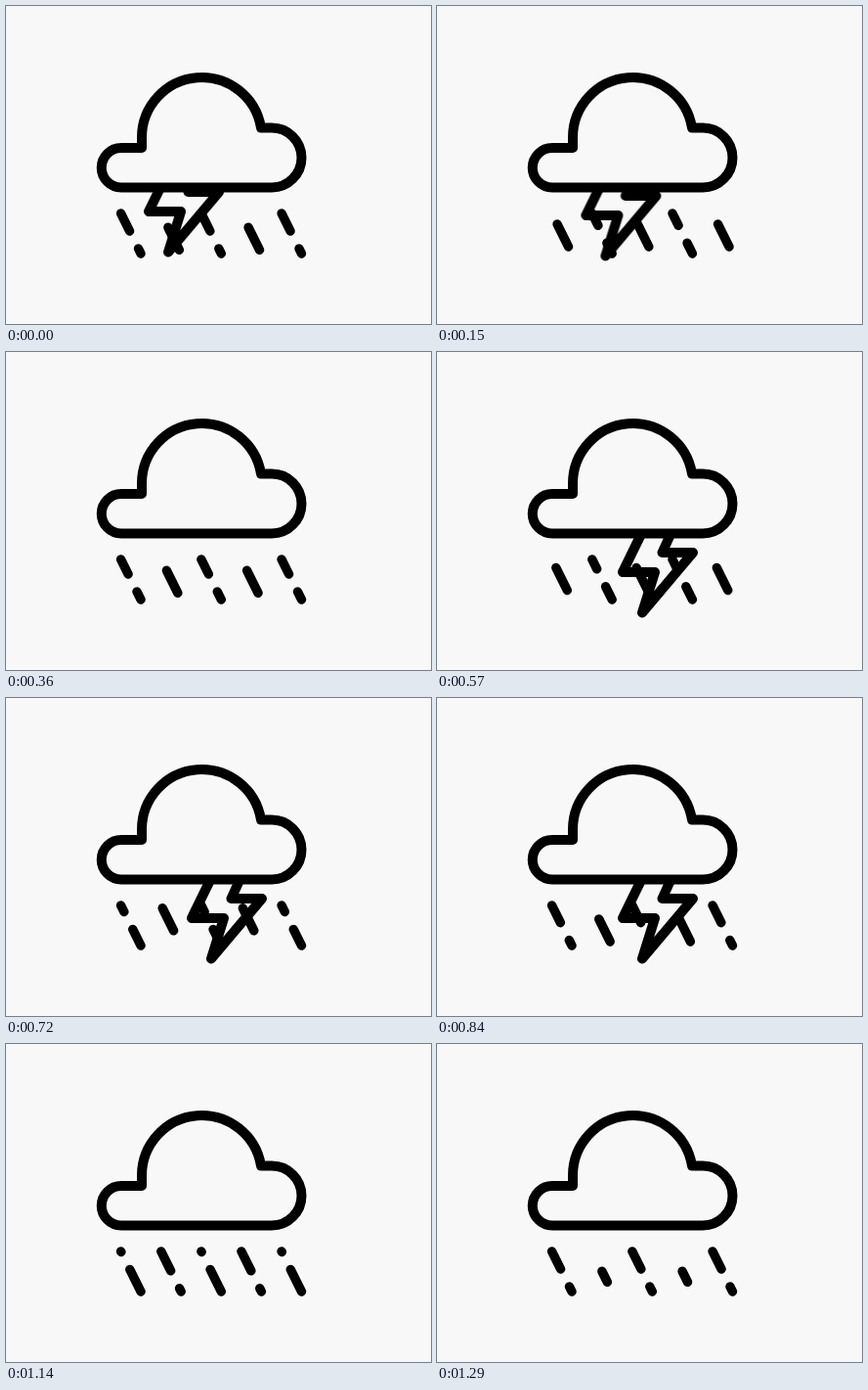
Animation, 435 px wide and 325 px high, one loop 1.35 s. Source, as an HTML page:

```html
<!DOCTYPE html>
<html lang="en">
<head>
<meta charset="utf-8">
<title>Thunderstorm</title>
<style>
  @property --fall { syntax: "<length>"; inherits: true; initial-value: 0px; }
  @property --trim { syntax: "<length>"; inherits: true; initial-value: 0px; }

  :root { --sky: #f8f8f8; --loop: 1350ms; }
  html, body { margin: 0; width: 100%; height: 100%; overflow: hidden; background: var(--sky); }
  svg {
    display: block; width: 435px; height: 325px;
    fill: none; stroke: #000; stroke-width: 10;
    stroke-linecap: round; stroke-linejoin: round;
  }
  .cloud { fill: var(--sky); }

  /* One dash pattern is exactly as long as a streak: 41 units */
  .rain { stroke-width: 9.5; animation: fall var(--loop) infinite; }
  .rain path {
    --lead: 0px;
    stroke-dasharray: calc(23px - 2 * var(--trim)) calc(18px + 2 * var(--trim));
    stroke-dashoffset: calc(5px - var(--lead) - var(--fall) - var(--trim));
  }
  .rain .even { --lead: 19.3px; animation: trim var(--loop) step-end infinite; }

  .flash { animation: flash var(--loop) step-end infinite; }
  .slide { animation: slide var(--loop) infinite; }
  .drop { animation: drop var(--loop) linear infinite; }

  @keyframes fall {
    0%     { --fall: 0px;     animation-timing-function: steps(5); }
    11.11% { --fall: 16px;    animation-timing-function: steps(7); }
    26.66% { --fall: 38px;    animation-timing-function: step-end; }
    31.11% { --fall: 41.3px;  animation-timing-function: steps(3); }
    37.77% { --fall: 51.2px;  animation-timing-function: step-end; }
    42.22% { --fall: 54.5px;  animation-timing-function: steps(5); }
    53.33% { --fall: 70.5px;  animation-timing-function: steps(9); }
    73.33% { --fall: 95.5px;  animation-timing-function: step-end; }
    77.77% { --fall: 98.7px;  animation-timing-function: step-end; }
    80%    { --fall: 102px;   animation-timing-function: step-end; }
    84.44% { --fall: 105.5px; animation-timing-function: steps(5); }
    95.55%, 100% { --fall: 123px; }
  }
  @keyframes trim {
    0% { --trim: 0px; }
    95.55%, 100% { --trim: 6px; }
  }
  @keyframes flash {
    0%, 35.55% { visibility: visible; }
    17.77%, 64.44%, 100% { visibility: hidden; }
  }
  @keyframes slide {
    0% { transform: translateX(-44px); animation-timing-function: ease-in-out; }
    42.22%, 100% { transform: none; }
  }
  @keyframes drop {
    0% { transform: translateY(-15px); }
    42.22%, 100% { transform: none; }
  }
</style>
</head>
<body>
<svg viewBox="0 0 435 325" role="img" aria-label="Thunderstorm">
  <g class="rain">
    <path pathLength="41" d="M117.6 212l20.4 41"/>
    <path pathLength="41" d="M158.8 212l20.4 41" class="even"/>
    <path pathLength="41" d="M199.9 212l20.4 41"/>
    <path pathLength="41" d="M241 212l20.4 41" class="even"/>
    <path pathLength="41" d="M282.1 212l20.4 41"/>
  </g>
  <g class="flash"><g class="slide">
    <path class="drop" d="M212 180L190 225H223L210 266.5L262 205H230.5L241 182"/>
  </g></g>
  <path class="cloud" d="M118 185.5A20.25 20.25 0 0 1 118 145H139V134.5A61.4 61.4 0 0 1 261 124.5H272A30.5 30.5 0 0 1 272 185.5Z"/>
</svg>
</body>
</html>
```
